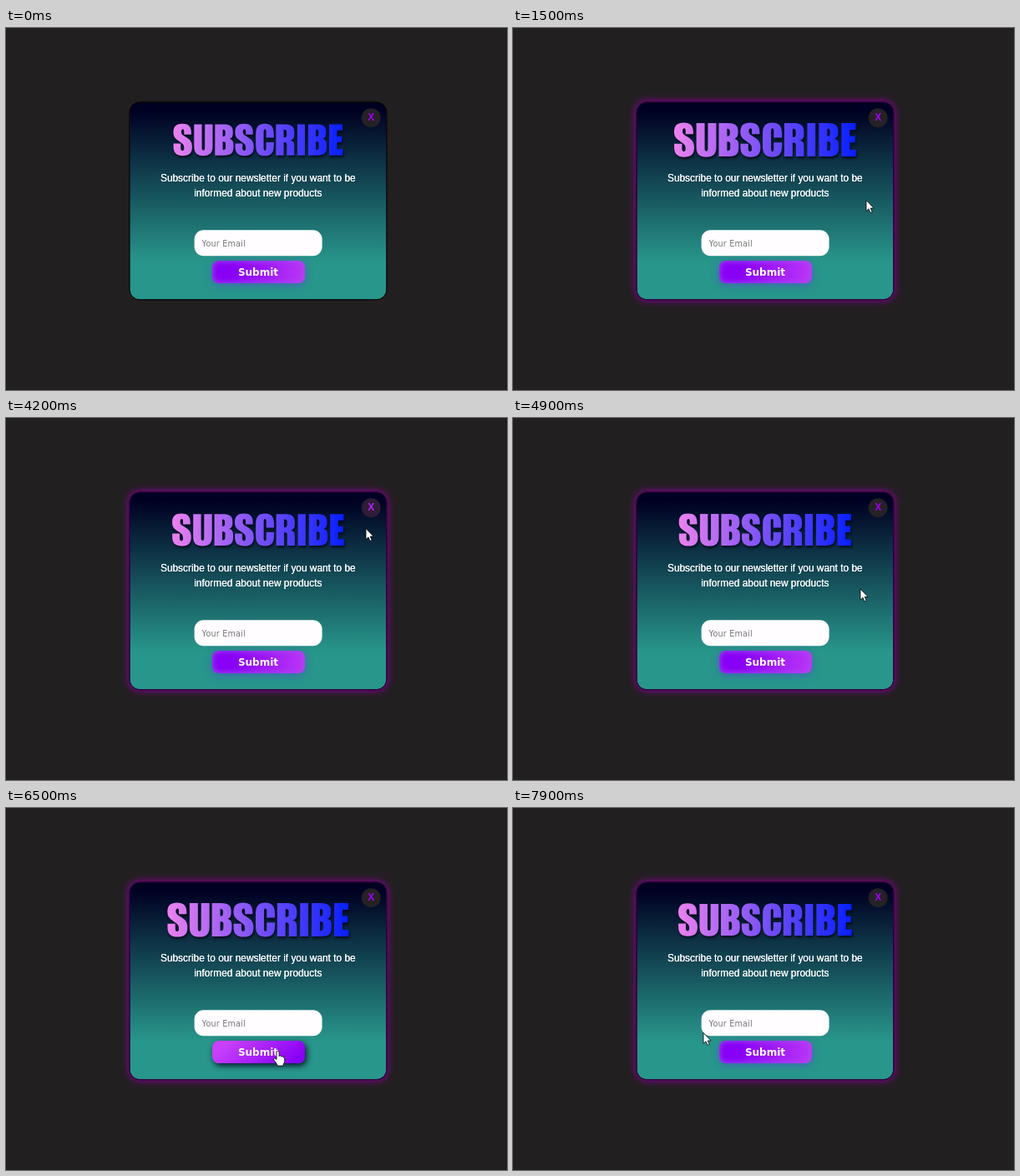
An HTML page for the animation above (8 s loop, 600 by 434 pixels).

```html
<!DOCTYPE html>
<html lang="en">
<head>
<meta charset="utf-8">
<title>Subscribe popup</title>
<style>
  html, body { margin: 0; width: 100%; height: 100%; overflow: hidden; background: #221f21; }
  #stage { position: relative; width: 600px; height: 434px; overflow: hidden; }
  #stage > * { position: absolute; box-sizing: border-box; }
  .card, .glow { left: 148px; top: 88px; width: 309px; height: 238px; border-radius: 13px;
    transform: translate(-.6px, .3px); }
  .card { border: 1px solid #000; background: linear-gradient(#000022 4%, #28968b 81%); }
  .glow { border: 1px solid #3c0050; box-shadow: 0 0 8px 1px #860092; opacity: 0; }
  .copy { left: 148px; top: 171px; width: 308px; margin: 0; text-align: center;
    font: 11.88px/18px "Liberation Sans", Arial, sans-serif; color: #fff; text-shadow: 0 0 .6px #fff;
    transform: translate(-.2px, -.5px); }
  .field { left: 226px; top: 242px; width: 153px; height: 31px; border-radius: 11px;
    background: #fffdff; padding-left: 9px; color: #757575; transform: translate(-.4px, .3px);
    font: 9.6px/33px "DejaVu Sans", sans-serif; letter-spacing: .2px; }
  .submit { left: 247px; top: 279px; width: 111px; height: 27px; border-radius: 8px; color: #fff;
    font: bold 12px/28px "DejaVu Sans", sans-serif; text-align: center; padding-right: 1px;
    background: linear-gradient(100deg, #8800f6 22%, #b834f6 95%);
    box-shadow: inset 0 0 6px 1px rgba(165, 85, 235, .75), 0 2px 10px rgba(80, 70, 205, .65); }
  .submit.hover { background: linear-gradient(140deg, #c840fc 15%, #8800f4 90%);
    box-shadow: 2px 3px 7px rgba(5, 5, 35, .9); }
  .close { left: 426px; top: 96px; width: 23px; height: 23px; border-radius: 50%;
    font: bold 12px/23px "Liberation Sans", Arial, sans-serif; text-align: center;
    transform: translate(-.3px, .2px); }
  svg { left: 0; top: 0; width: 600px; height: 434px; }
  #title { transform-origin: 302px 134px; filter: drop-shadow(1.5px 2px 1.5px rgba(0, 0, 12, .75)); }
</style>
</head>
<body>
<div id="stage">
  <div class="card"></div>
  <div class="glow" id="glow"></div>
  <p class="copy">Subscribe to our newsletter if you want to be<br>informed about new products</p>
  <div class="field">Your Email</div>
  <div class="submit" id="submit">Submit</div>
  <div class="close" id="close">X</div>
  <svg viewBox="0 0 600 434">
    <defs>
      <linearGradient id="ink" gradientUnits="userSpaceOnUse" x1="198" y1="0" x2="402" y2="0">
        <stop offset="0" stop-color="#ee82ee"/>
        <stop offset="1" stop-color="#0820ff"/>
      </linearGradient>
      <clipPath id="letters"></clipPath>
    </defs>
    <g id="title" role="img" aria-label="SUBSCRIBE">
      <rect x="195" y="110" width="215" height="50" fill="url(#ink)" clip-path="url(#letters)"/>
    </g>
    <g id="cursor" fill="#fff" stroke="#000" stroke-linejoin="round">
      <path id="arrow" stroke-width=".8" d="M0 0V13L3 10.3 5 15 7.2 14 5.2 9.5H9.2Z"/>
      <path id="hand" stroke-width=".8" d="M-1.5 1.3Q-1.5 0 0 0T1.6 1.3V6.2Q2 5.2 3.2 5.4T4.3 6.8
        Q4.8 5.9 5.8 6.2T6.7 7.6Q8 6.8 8.2 8.8V12Q8 14 6.7 15.4V17.6H-.8V16L-4.7 10.6
        Q-5.4 9.2-4.4 8.6T-1.5 10Z"/>
    </g>
  </svg>
</div>
<script>
  const $ = id => document.getElementById(id);
  const LOOP = 8000, STEP = 100;

  // Heavy condensed capitals, 38 units tall
  const GLYPHS = {
    S: 'M21.6 12.5H13V9Q13 6 11.4 6T9.6 8.6C9.6 12 10.5 12.8 14 15C20.5 19 22.6 21.5 22.6 28C22.6 35.5 19 38.6 11.4 38.6C4 38.6.3 35 .3 28V23.5H9V29Q9 32.4 11 32.4T13 29.5C13 25.5 12.3 24.5 8 21.5C2 17.5.2 15.5.2 9.8C.2 2.5 4-.6 11-.6C18-.6 21.6 2.5 21.6 10Z',
    U: 'M0 0H9.3V29Q9.3 32 11.1 32T12.9 29V0H22.2V27C22.2 35 19 38.6 11.1 38.6S0 35 0 27Z',
    B: 'M0 0H10C18 0 21.5 2.5 21.5 9V11C21.5 15 20.2 17 17.5 17.8C20.8 18.8 22.2 21 22.2 25V28C22.2 35.5 19 38 11 38H0Z M9.3 6.5V14.8C11.5 14.8 12.3 14.3 12.3 12V9.5C12.3 7.2 11.6 6.5 9.3 6.5Z M9.3 21.2V31.5C12 31.5 12.8 30.8 12.8 28V24.5C12.8 21.8 12 21.2 9.3 21.2Z',
    C: 'M21.6 16.5H12.4V9Q12.4 6 10.9 6T9.4 9V29.5Q9.4 32.4 10.9 32.4T12.4 29.5V22H21.6V26C21.6 35 18 38.6 10.8 38.6S0 35 0 26V12C0 3 3.5-.6 10.8-.6S21.6 3 21.6 12Z',
    R: 'M0 0H10C18 0 22 2.2 22 10V12.5C22 17 20.5 19 16.8 19.8C21 20.5 22 22.5 22 27V38H13V25.5C13 22.8 12.3 22.2 9.3 22.2V38H0Z M9.3 6.5V16C11.8 16 12.8 15.6 12.8 13V9.5C12.8 7.2 12 6.5 9.3 6.5Z',
    I: 'M0 0H9.2V38H0Z',
    E: 'M0 0H16V7.6H9.4V14.8H15.2V22H9.4V30.4H16.2V38H0Z'
  };
  const LETTER_X = [200.3, 225.3, 250.3, 274.2, 299.2, 323.3, 348.9, 361.9, 387];

  [...'SUBSCRIBE'].forEach((letter, i) => {
    const path = document.createElementNS('http://www.w3.org/2000/svg', 'path');
    path.setAttribute('d', GLYPHS[letter]);
    path.setAttribute('transform', `translate(${LETTER_X[i]} 115.4) scale(1 .98)`);
    path.setAttribute('clip-rule', 'evenodd');
    $('letters').append(path);
  });

  // Pointer route: time, x, y
  const ROUTE = [
    [0, 380, 470], [300, 383, 437], [900, 398, 332], [1500, 423, 206.5], [2200, 435, 112],
    [2500, 435, 110], [3600, 435, 110], [3950, 433, 120], [4200, 431, 132.5], [4900, 416, 205],
    [5700, 383, 281.5], [6000, 355, 290], [6500, 325.5, 291.5], [7000, 318, 292],
    [7500, 250, 286], [7900, 228, 269.5], [8000, 228, 269.5]
  ];

  const clamp = v => Math.min(1, Math.max(0, v));
  const fade = (t, on, off, span) => clamp((t - on) / span) - clamp((t - off) / span);
  const mix = (a, b, k) => `rgb(${a.map((v, i) => Math.round(v + (b[i] - v) * k))})`;

  function pointerAt(t) {
    const i = Math.max(1, ROUTE.findIndex(p => p[0] > t));
    const [t0, x0, y0] = ROUTE[i - 1], [t1, x1, y1] = ROUTE[i];
    const k = (t - t0) / (t1 - t0);
    return [x0 + (x1 - x0) * k, y0 + (y1 - y0) * k];
  }

  function draw(t) {
    const pulse = (1 + Math.cos(2 * Math.PI * (t - 1530) / 1010)) / 2;
    $('title').style.transform = `scale(${1 + 0.075 * pulse})`;

    const onClose = t >= 2200 && t < 3950;
    const onSubmit = t >= 6000 && t < 7500;
    const heat = fade(t, 2150, 3900, 350);
    $('close').style.background = mix([37, 33, 36], [108, 4, 166], heat);
    $('close').style.color = mix([160, 0, 250], [255, 255, 255], heat);
    $('glow').style.opacity = fade(t, 900, LOOP, 300);
    $('submit').classList.toggle('hover', onSubmit);

    const [x, y] = pointerAt(t);
    $('cursor').setAttribute('transform', `translate(${x} ${y})`);
    $('hand').style.display = onClose || onSubmit ? '' : 'none';
    $('arrow').style.display = onClose || onSubmit ? 'none' : '';
  }

  const start = performance.now();
  function tick() {
    const t = (performance.now() - start) % LOOP;
    draw(Math.floor(t / STEP) * STEP);
    requestAnimationFrame(tick);
  }
  tick();
</script>
</body>
</html>
```
